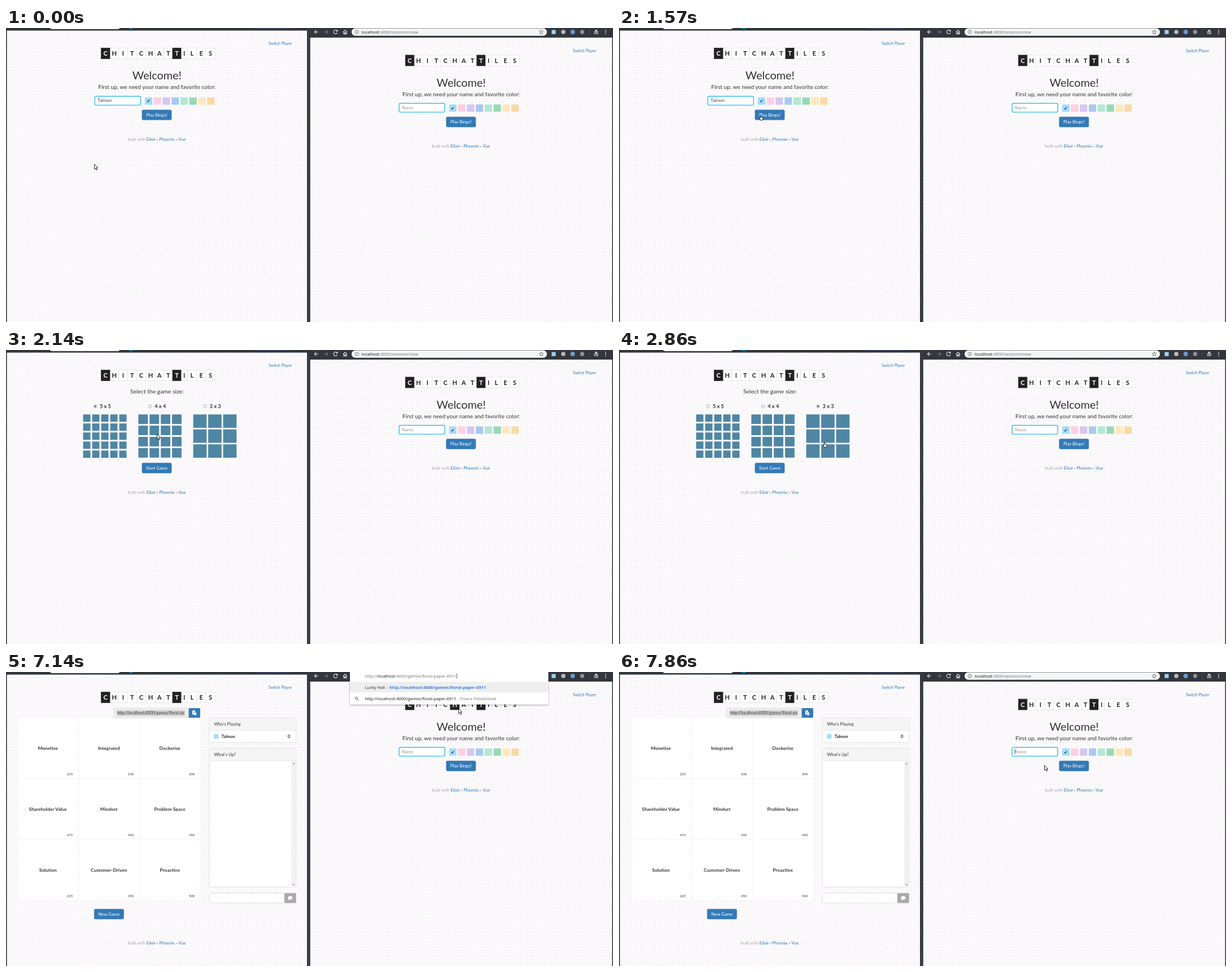
An HTML page for the animation above (8 s loop, 1075 by 521 pixels).

```html
<!DOCTYPE html>
<html lang="en">
<head>
<meta charset="utf-8">
<title>Word game</title>
<style>
  html, body { margin: 0; width: 100%; height: 100%; overflow: hidden; background: #32363c; }
  svg { display: block; width: 1075px; height: 521px; font-family: Lato, "Open Sans", sans-serif; }
  text { white-space: pre; }
  .ui { font-family: "Noto Sans", "Open Sans", sans-serif; }
  .mark { font-family: "DejaVu Sans", sans-serif; }
  .mid { text-anchor: middle; }
  .end { text-anchor: end; }
  .bold { font-weight: 700; }
  .icon { fill: none; stroke: #e4e6e9; stroke-width: 1.1; }
</style>
</head>
<body>
<svg id="stage" viewBox="0 0 1075 521" xmlns="http://www.w3.org/2000/svg"></svg>
<script>
const LOOP = 8000;
const BLUE = '#337ab7';
const RIGHT = 'translate(538.8 12.5)';

const rect = (x, y, w, h, fill, more = '') =>
  `<rect x="${x}" y="${y}" width="${w}" height="${h}" fill="${fill}" ${more}/>`;
const text = (x, y, size, str, fill = '#333', cls = '') =>
  `<text x="${x}" y="${y}" font-size="${size}" fill="${fill}" class="${cls}">${str}</text>`;
const path = (d, more = '') => `<path d="${d}" ${more}/>`;
const group = (cls, body, more = '') => `<g class="${cls}" ${more}>${body}</g>`;

// Page parts, in left-window coordinates
const edges = [168.5, 184, 199.5, 215.5, 231, 248, 264, 279.5, 295, 310, 321.5, 337.5, 354, 370];
const title = 'CHITCHATTILES';

function tile(i, dark) {
  const x = edges[i], w = edges[i + 1] - x;
  return rect(x, 35.5, w, 19, dark ? '#222' : '#fff', `stroke="${dark ? '#222' : '#ddd'}" stroke-width=".7"`) +
    text(x + w / 2, 49, 11.2, title[i], dark ? '#fff' : '#222', 'mid bold');
}

const header = () =>
  text(465, 30.3, 7, 'Switch Player', BLUE) +
  [...title].map((c, i) => tile(i, false)).join('') + tile(0, true) + tile(8, true);

const button = (x, y, label, fill = BLUE, line = '#2e6da4') =>
  rect(x, y, 52, 17.6, fill, `rx="2" stroke="${line}" stroke-width=".7"`) +
  text(x + 26, y + 11.5, 7.75, label, '#fff', 'mid');

const footer = y =>
  text(215.7, y, 7.6, 'built with', '#aaa') +
  text(248.8, y, 7.6, 'Elixir', BLUE) + text(268, y, 6.5, '•', '#aaa', 'mid') +
  text(271.4, y, 7.7, 'Phoenix', BLUE) + text(302.3, y, 6.5, '•', '#aaa', 'mid') +
  text(305.4, y, 7.6, 'Vue', BLUE);

const swatches = ['#a2dcfb', '#fccfe2', '#d6c6f0', '#aac8f1', '#b1e9d2', '#99d9b6', '#fee8bb', '#fad9a5'];

const welcome = (name, fill) =>
  text(267.3, 91.3, 19.8, 'Welcome!', '#333', 'mid') +
  text(267.3, 108.3, 10.1, 'First up, we need your name and favorite color:', '#333', 'mid') +
  rect(157.4, 121, 80.8, 15.6, '#fff', 'rx="2" stroke="#35bdea" stroke-width="1.4"') +
  text(162.2, 131.4, 7.9, name, fill) +
  swatches.map((c, i) => rect(246 + 15.75 * i, 123, 13, 13, c)).join('') +
  text(252.5, 132.4, 7.6, '✔', '#222', 'mid mark') +
  button(241, 145.2, 'Play Bingo!') + footer(199.5);

function board(n, x, pitch, cell) {
  let out = '';
  for (let i = 0; i < n * n; i++)
    out += rect(x + pitch * (i % n), 114.2 + pitch * Math.floor(i / n), cell, cell, '#4f86a3');
  return out;
}

const radio = (x, label) =>
  `<circle cx="${x}" cy="99.8" r="3.1" fill="#efefef" stroke="#aaa" stroke-width=".7"/>` +
  text(x + 8, 102.8, 9.2, label, '#333', 'bold');
const dot = (x, cls) => `<circle class="${cls}" cx="${x}" cy="99.8" r="1.6" fill="#555"/>`;

const sizes = () =>
  text(267.3, 77, 10.35, 'Select the game size:', '#333', 'mid') +
  radio(158, '5 x 5') + radio(255.3, '4 x 4') + radio(352.6, '3 x 3') +
  dot(158, 'pick5') + dot(352.6, 'pick3') +
  board(5, 136.6, 16, 12.9) + board(4, 234.4, 19.9, 16.8) + board(3, 331.6, 26.5, 23.7) +
  button(241, 200.3, 'Start Game') +
  group('startHover', button(241, 200.3, 'Start Game', '#286090', '#204d74')) + footer(254.7);

const words = [
  ['Monetize', 225], ['Integrated', 100], ['Dockerize', 300],
  ['Shareholder Value', 475], ['Mindset', 450], ['Problem Space', 450],
  ['Solution', 225], ['Customer-Driven', 450], ['Proactive', 500]
];

const cards = () => words.map(([word, points], i) => {
  const x = 22 + 108 * (i % 3), y = 82 + 108 * Math.floor(i / 3);
  return rect(x, y, 105.6, 105.4, '#fff', 'rx="1.5"') +
    text(x + 52.2, y + 55.6, 8.4, word, '#333', 'mid bold') +
    text(x + 96.3, y + 101, 6, points, '#333', 'end');
}).join('');

const frame = (x, y, w, h, fill) => rect(x, y, w, h, fill, 'rx="2" stroke="#d4d4d4" stroke-width=".7"');

const panel = (y, h, label) =>
  frame(360.2, y, 153.6, h, '#fff') + rect(360.6, y + .4, 152.8, 21, '#f5f5f5') +
  rect(360.4, y + 21.4, 153.2, .6, '#ddd') + text(368.4, y + 13.5, 7.7, label);

const game = () => cards() +
  frame(190.4, 64, 133.3, 17, '#eee') + rect(196.5, 68, 120.5, 9.5, '#c9c9c9') +
  text(196.7, 75, 7.2, 'http://localhost:4000/games/floral-pa', '#444') +
  rect(323.5, 64, 20.4, 17, BLUE, 'rx="1.5"') +
  rect(330, 68.6, 5, 7, '#fff', 'rx=".6"') + rect(331.2, 67.8, 2.6, 1.6, '#fff') +
  rect(332.8, 71.2, 4.4, 5.6, '#fff', `stroke="${BLUE}" stroke-width=".6"`) +
  panel(81.6, 43.4, 'Who\'s Playing') + panel(135.6, 245.4, 'What\'s Up?') +
  rect(368.3, 110, 8, 8, '#a2dcfb') +
  text(381.8, 116.8, 7.4, 'Talmon', '#222', 'bold') + text(503.2, 116.8, 7.4, '0', '#222', 'end bold') +
  rect(505.4, 158, 8, 222.6, '#f1f1f1') +
  path('M507.6 163.2h3.4l-1.7-2.4zM507.6 376h3.4l-1.7 2.4z', 'fill="#777"') +
  frame(360.2, 392, 133, 17.2, '#fff') + rect(493, 391.8, 20.8, 17.6, '#aaa', 'rx="1.5"') +
  '<ellipse cx="503.4" cy="400.2" rx="4" ry="3.1" fill="#fff"/>' + path('M500.4 401.5l-.8 3 3-1.4z', 'fill="#fff"') +
  button(156.4, 420.2, 'New Game') + footer(482.7);

// Browser chrome
const ui = (x, y, str, fill, cls = '') => text(x, y, 7.45, str, fill, 'ui ' + cls);
const span = (str, fill) => `<tspan fill="${fill}">${str}</tspan>`;
const address = rest => ui(629.8, 9.7, 'localhost' + span(rest, '#74777c'), '#222');

const toolbar = () =>
  rect(535.5, 0, 540, 17, '#33373d') +
  path('M553.3 7h-7m3.2-3.2L546.3 7l3.2 3.2M597 7.4l3.6-3.6 3.6 3.6M598.2 6.6v4h1.6v-2.4h1.6v2.4h1.6v-4', 'class="icon"') +
  path('M563 7h7m-3.2-3.2L570 7l-3.2 3.2', 'class="icon" style="stroke:#777b81"') +
  rect(612, .5, 346, 13.2, '#f4f5f6', 'rx="6.6"') +
  '<circle cx="621.3" cy="7" r="3.2" fill="none" stroke="#666" stroke-width=".8"/>' +
  path('M621.3 6.5v2.3M621.3 4.9v.8', 'stroke="#666" stroke-width=".8"') +
  path('M948 3.4l1.1 2.4 2.6.3-1.9 1.8.5 2.6-2.3-1.3-2.3 1.3.5-2.6-1.9-1.8 2.6-.3z', 'fill="none" stroke="#555" stroke-width=".8"') +
  rect(966.3, 3.6, 7.2, 7.2, '#9cd0ee') +
  '<circle cx="987" cy="7" r="3.8" fill="#b9bcbf"/><circle cx="1003.6" cy="7" r="3.9" fill="#6d98cf"/>' +
  '<circle cx="1020.4" cy="7" r="3.7" fill="#8d9196"/>' +
  rect(1032.3, 2, .7, 10, '#555a61') +
  path('M1043 5.6l.7-2.4h3l.7 2.4zM1041.2 6h8v.8h-8z', 'fill="#eee"') +
  '<g fill="none" stroke="#eee" stroke-width=".9"><circle cx="1043.3" cy="9.2" r="1.4"/><circle cx="1047.1" cy="9.2" r="1.4"/></g>' +
  [3.9, 7, 10.1].map(y => `<circle cx="1062" cy="${y}" r=".9" fill="#eee"/>`).join('') +
  group('idle', path('M586.4 5A3.4 3.4 0 1 0 586.8 8.2M587 3.2V5.8H584.4', 'class="icon"') + address(':4000/sessions/new')) +
  group('typed', path('M586.4 5A3.4 3.4 0 1 0 586.8 8.2M587 3.2V5.8H584.4', 'class="icon"')) +
  group('loading', path('M580.8 4.2l5.6 5.6m0-5.6l-5.6 5.6', 'class="icon"') + address(':4000/games/floral-paper-6911'));

const link = 'http://localhost:4000/games/floral-paper-6911';
const suggestions = () =>
  rect(609, -4, 351.5, 61.6, '#fff', 'rx="2" filter="url(#shade)"') + rect(609, 17.6, 351.5, 18.4, '#eee') +
  ui(635.7, 9.7, 'http://' + span('localhost', '#222') + ':4000/games/floral-paper-6911', '#777') +
  rect(798.3, 2.4, .7, 9.6, '#222') +
  ui(635.7, 29.5, 'Lucky Hall - ', '#333') + ui(678.8, 29.5, link, '#3a7de0', 'bold') +
  '<circle cx="620.6" cy="46.4" r="2.1" fill="none" stroke="#555" stroke-width=".9"/>' +
  path('M622.2 48l2.4 2.4', 'stroke="#555" stroke-width="1"') +
  ui(635.7, 49.8, link + span(' - Поиск PebbleSeek', '#7d7d7d'), '#222');

const pointer = () =>
  `<g class="cursor" fill="#fff" stroke="#111" stroke-width=".9" stroke-linejoin="round">` +
  path('M.5.5V9.2L2.5 7.4 4 10.7 5.5 10 4 6.8H6.8z', 'class="arrow"') +
  path('M2 1.2q.8-1.2 1.6 0V4l2.6.7q1 .4.8 1.6L6.4 9.3H2.8L.5 6q.3-1 1.5-.1z', 'class="hand"') + '</g>';

const ring = (at, size) =>
  `<rect x="${at}" y="${at}" width="${size}" height="${size}" rx="2" fill="none" stroke="#f6f2f6" stroke-width="1.7"/>`;

document.getElementById('stage').innerHTML =
  `<defs><pattern id="paper" x="-2" y="8" width="21.35" height="21.35" patternUnits="userSpaceOnUse">
    <rect width="22" height="22" fill="#fdfcfd"/>${ring(2.2, 17)}${ring(6.9, 7.6)}</pattern>
    <filter id="shade" x="-5%" y="-10%" width="110%" height="130%">
    <feDropShadow dx="0" dy="1" stdDeviation="1.5" flood-opacity=".4"/></filter></defs>` +
  rect(0, 0, 1075, 521, '#32363c') +
  rect(77, -6, 125.5, 8, '#f4f5f6', 'rx="5"') + rect(218, 0, 6, 1.8, '#0d8ba5') +
  rect(440, 0, 65, 1.2, '#3d4567') +
  rect(1.6, 4.6, 531.4, 517, 'url(#paper)') + rect(535.3, 0, .8, 521, '#555960') +
  header() +
  group('welcome', welcome('Talmon', '#444') +
    group('playHover', button(241, 145.2, 'Play Bingo!', '#286090', '#204d74')) +
    group('playDown', button(241, 145.2, 'Play Bingo!', '#255b8a', '#3a8fd0'))) +
  group('sizes', sizes()) + group('game', game()) +
  group('', rect(0, 4.5, 535, 505, 'url(#paper)') + header() + group('tileHover', tile(5, true)) +
    welcome('Name', '#999') + group('caret', rect(162.3, 124.6, .7, 8.6, '#222')), `transform="${RIGHT}"`) +
  rect(1073.6, 0, 1.4, 521, '#32363c') +
  toolbar() + group('menu', suggestions()) + pointer();

// Timing: each part is shown between given times, in ms
const pct = ms => ms * 100 / LOOP + '%';
const loop = (cls, frames) =>
  `.${cls}{animation:${cls} ${LOOP}ms step-end infinite}@keyframes ${cls}{${frames}}`;
const show = (cls, from, to = LOOP) =>
  loop(cls, `0%{opacity:0}${pct(from)}{opacity:1}${pct(to)},100%{opacity:0}`);

const moves = [
  [0, 156, 241], [710, 212, 181], [860, 226, 165], [1000, 229, 166], [1570, 248, 154, 1],
  [1710, 266, 149, 1], [2000, 267, 148.5], [2290, 266, 148.5, 1], [2430, 272, 160, 1],
  [2570, 358, 161, 1], [2710, 374, 157, 1], [2860, 361, 163, 1], [3000, 294, 186],
  [3140, 280, 195], [3290, 279.5, 198], [3430, 278.5, 206, 1], [7140, 801, 64.5],
  [7570, 800, 79], [7710, 791, 128], [7860, 753, 165]
];
const track = rule => moves.map(m => `${pct(m[0])}{${rule(m)}}`).join('');

const style = document.createElement('style');
style.textContent =
  show('welcome', 0, 2140) + show('playHover', 1710, 2000) + show('playDown', 2000, 2140) +
  show('sizes', 2140, 7140) + show('pick5', 0, 2860) + show('pick3', 2860) + show('startHover', 3430) +
  show('game', 7140) + show('menu', 7140, 7290) + show('typed', 7140, 7290) + show('loading', 7290, 7430) +
  show('tileHover', 7140, 7570) + show('caret', 7430) +
  loop('idle', `0%{opacity:1}${pct(7140)}{opacity:0}${pct(7430)},100%{opacity:1}`) +
  loop('cursor', track(([, x, y]) => `transform:translate(${x}px,${y}px)`)) +
  loop('arrow', track(m => `opacity:${m[3] ? 0 : 1}`)) +
  loop('hand', track(m => `opacity:${m[3] ? 1 : 0}`));
document.head.append(style);
</script>
</body>
</html>
```
